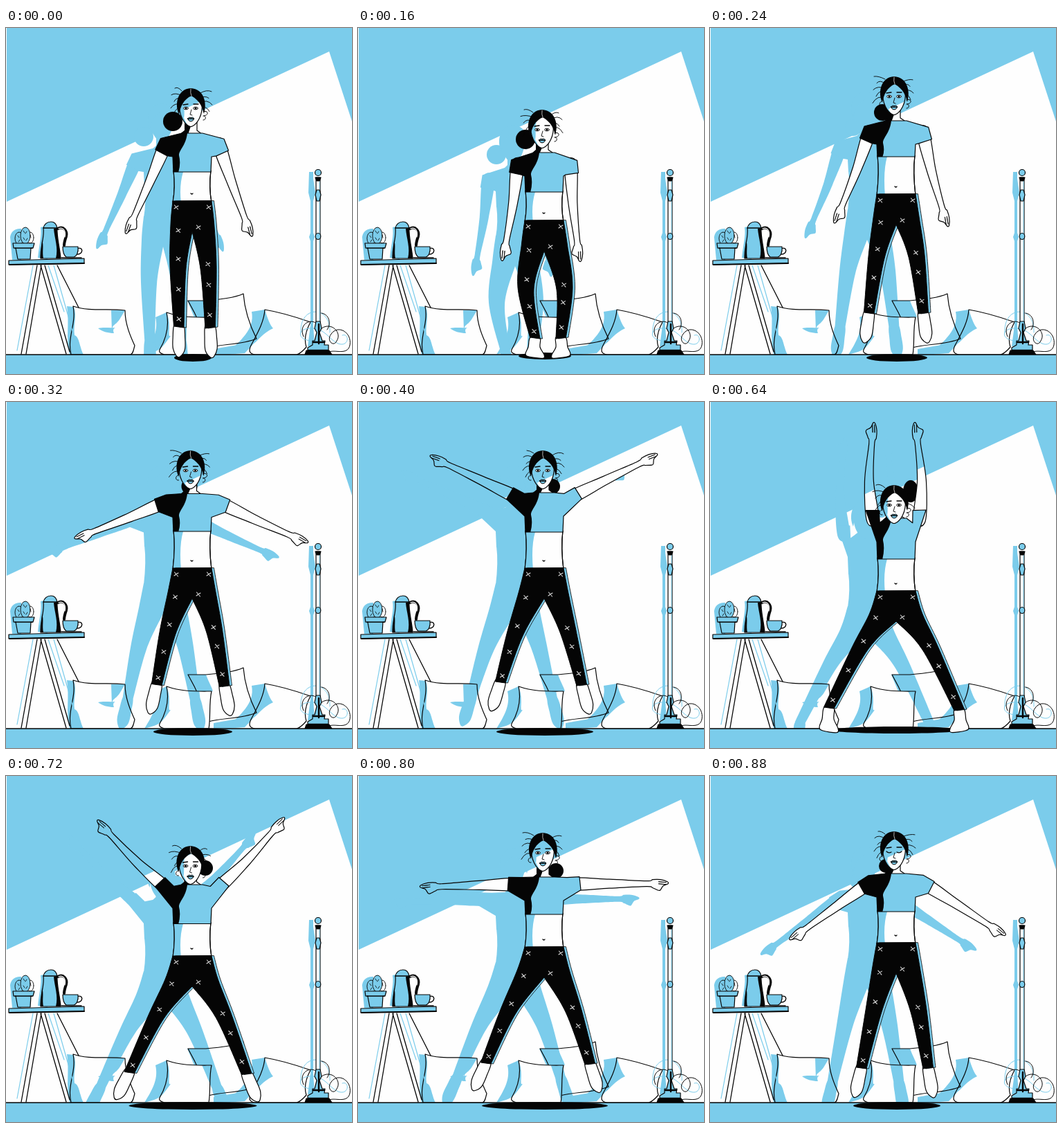
Write an HTML page with a canvas that moves like this. It is 500x500 px and loops after 960 ms.

```html
<!DOCTYPE html>
<html lang="en">
<head>
<meta charset="utf-8">
<title>Jumping jacks</title>
<style>
html, body { margin: 0; width: 500px; height: 500px; overflow: hidden; background: #fefefe; }
canvas { display: block; width: 500px; height: 500px; }
</style>
</head>
<body>
<canvas id="stage" width="500" height="500"></canvas>
<script>
const ctx = document.getElementById('stage').getContext('2d');
const BLUE = '#7bcceb', INK = '#050505', WHITE = '#fefefe';
const CX = 269, FLOOR = 472, RAD = Math.PI / 180;

// face x, y | bun x, y, r | neck, hem, waist | floor shadow radius
const BODY = [
  [267, 118, 241, 135, 14, 152, 208, 250, 27],
  [266, 149, 242, 161, 14, 180, 237, 278, 38],
  [266, 101, 249, 122, 12, 134, 186, 240, 44],
  [267, 101, 281, 122, 11, 131, 188, 240, 70],
  [266, 151, 290, 129, 11, 168, 227, 273, 94],
  [267, 113, 286, 137, 11, 146, 200, 247, 91],
  [266, 111, 254, 130, 10, 141, 196, 241, 63]
];
// left angle, right angle (0 is down, 180 is up), elbow bend
const ARMS = [
  [23, 19, 1], [8, 4.5, 2], [20, 14, 2], [115, 116, 0], [179, 181, 5], [88, 90, 0], [54, 57, 0]
];
// left knee, left ankle, right knee, right ankle
const LEGS = [
  [249, 345, 250, 431, 292, 345, 295, 432],
  [243, 375, 256, 447, 298, 375, 293, 447],
  [241, 330, 230, 411, 298, 328, 308, 411],
  [227, 335, 206, 404, 303, 330, 323, 408],
  [217, 355, 172, 441, 318, 355, 360, 444],
  [217, 340, 185, 414, 311, 338, 335, 415],
  [237, 338, 219, 421, 301, 338, 315, 421]
];
// start time, from pose, to pose, blend, feet flat
const STEPS = [
  [0, 0, 0, 0, 0], [80, 0, 1, .6, 1], [160, 1, 1, 0, 1], [240, 2, 2, 0, 0],
  [320, 2, 3, .5, 0], [400, 3, 3, 0, 0], [520, 3, 4, .4, 0], [560, 3, 4, .8, 1],
  [640, 4, 4, 0, 1], [720, 4, 5, .5, 0], [800, 5, 5, 0, 0], [880, 6, 6, 0, 0]
];
const LOOP = 960;

const mix = (table, a, b, k) => table[a].map((v, i) => v + (table[b][i] - v) * k);
const lerp = (a, b, k) => [a[0] + (b[0] - a[0]) * k, a[1] + (b[1] - a[1]) * k];
const shift = (p, d, n, u, v) => [p[0] + d[0] * u + n[0] * v, p[1] + d[1] * u + n[1] * v];
const axes = (deg, side) => {
  const s = Math.sin(deg * RAD), c = Math.cos(deg * RAD);
  return [[side * s, c], [side * c, -s]];
};

const wall = new Path2D('M1 0H500V135L467 34L1 251Z');
const figureLight = new Path2D('M0 -20H500V105L467 20L0 237Z');

function poly(pts) {
  const p = new Path2D();
  pts.forEach(q => p.lineTo(q[0], q[1]));
  p.closePath();
  return p;
}

// smooth line through points, added to path p
function spline(p, pts, closed) {
  const n = pts.length, at = i => closed ? pts[(i + n) % n] : pts[Math.max(0, Math.min(n - 1, i))];
  p.lineTo(...pts[0]);
  for (let i = 0; i < (closed ? n : n - 1); i++) {
    const [a, b, c, d] = [at(i - 1), at(i), at(i + 1), at(i + 2)];
    p.bezierCurveTo(b[0] + (c[0] - a[0]) / 6, b[1] + (c[1] - a[1]) / 6,
      c[0] - (d[0] - b[0]) / 6, c[1] - (d[1] - b[1]) / 6, c[0], c[1]);
  }
  return p;
}

function disc(x, y, rx, ry = rx) {
  const p = new Path2D();
  p.ellipse(x, y, rx, ry, 0, 0, 7);
  return p;
}

function fill(p, color) { ctx.fillStyle = color; ctx.fill(p); }
function line(p, color = INK, w = 1.2) {
  ctx.strokeStyle = color;
  ctx.lineWidth = w;
  ctx.stroke(typeof p === 'string' ? new Path2D(p) : p);
}
function shape(d, color, w = 1.2) {
  const p = typeof d === 'string' ? new Path2D(d) : d;
  if (color) fill(p, color);
  if (w) line(p, INK, w);
}
function within(p, draw) { ctx.save(); ctx.clip(p); draw(); ctx.restore(); }

// ---- room ----
const PILLOWS = [
  'M289 394C310 392 330 390 343 384C345 410 355 435 362 449C340 458 315 456 292 462C286 440 275 415 263 394Z',
  'M232 411C255 419 275 418 297 418C293 436 296 456 293 472H229C222 470 221 468 222 465C232 448 236 430 232 411Z',
  'M374 407C398 411 420 418 440 425C432 440 431 452 434 461C428 468 424 471 420 472H360C348 470 352 462 356 455C364 440 373 424 374 407Z',
  'M97 402C120 410 148 405 172 408C172 428 180 446 186 459C184 466 184 470 180 472H94C88 446 102 428 97 402Z'
].map(d => new Path2D(d));
const SHADES = [
  'M262 394L289 394C295 410 302 420 297 418L272 418Z',
  'M216 418L232 411C240 430 232 448 238 445C230 455 226 464 214 468L200 472C214 450 220 436 216 418Z',
  'M355 410L374 407C378 420 382 430 386 434C372 440 364 452 358 456L345 470L318 472C338 452 360 436 355 410Z',
  'M300 464L345 456L340 466L322 472H300Z',
  'M88 402L98 403C103 416 97 430 99 444C106 446 106 460 112 472H92C86 450 92 425 88 402Z',
  'M133 434C142 432 150 434 158 433C154 435 155 438 156 441C148 441 140 439 133 434Z',
  'M152 408L172 408L166 418C158 432 154 426 153 438Z'
].map(d => new Path2D(d));

function backdrop() {
  fill(poly([[0, 0], [500, 0], [500, 500], [0, 500]]), WHITE);
  fill(wall, BLUE);
  PILLOWS.forEach(p => fill(p, WHITE));
  SHADES.forEach(p => fill(p, BLUE));
}

function table() {
  line('M39 343L16 466M69 343L100 452M61 343L84 410', BLUE, 1.2);
  line('M45 343L22 471M51 343L29 471M50 343L87 471M56 343L92 468M74 343L105 404', INK, 1.3);
  shape('M4 336L113 333V340L4 342Z', BLUE);
  line('M5 342L113 340', INK, 2);
  // cactus and pot
  fill(new Path2D('M6 302C8 290 18 290 22 290V335H9Z'), BLUE);
  for (const [x, y, rx, ry] of [[19, 304, 6, 9], [35, 303, 5, 8], [28, 300, 7, 12]])
    shape(disc(x, y, rx, ry), x > 30 ? WHITE : BLUE, .9);
  line('M25 293l2 3M30 294l-2 3M25 303l2 3M31 304l-2 3M17 300l2 3M35 299l1 4M20 306l-2 3', INK, .8);
  shape('M10 311H41L39 318H36L35 334H17L14 318H11Z', BLUE);
  line('M13 318H38', INK, 1.6);
  // pitcher
  fill(new Path2D('M46 332C48 312 52 300 50 288L60 286V334Z'), BLUE);
  shape('M54 289C55 284 59 280 65 280C70 280 73 284 74 289C73 302 78 318 79 333H50C49 318 56 302 54 289Z', BLUE);
  fill(new Path2D('M69 290L74 289C73 302 78 318 79 333H72C76 318 70 304 69 290Z'), INK);
  fill(new Path2D('M52 306L50 333H54C52 324 55 314 52 306Z'), INK);
  line('M54 289H74', INK, 1.5);
  line('M75 290C83 285 89 294 87 301C85 307 84 310 84 314', INK, 4);
  line('M76 290C83 287 87 294 85 302', WHITE, 1.2);
  // cup
  line('M103 319C112 315 112 327 103 327', INK, 1.4);
  shape('M82 316H104C105 324 102 330 98 331H87C83 328 82 322 82 316Z', BLUE);
  line('M80 332H109', INK, 1.5);
}

function lamp() {
  fill(new Path2D('M438 208H444V218L447 238L444 250V296L446 302L444 308V430L446 460H436L440 430V308L438 302L440 296V250L437 238Z'), BLUE);
  line('M443 452C420 452 420 434 440 434C462 434 466 450 480 456C496 462 497 440 486 444M426 440C424 400 470 400 468 440', BLUE, 1);
  line('M456 434C470 424 486 440 478 452C474 462 462 452 470 442C480 428 500 440 497 458C494 474 474 464 468 468M430 446C422 428 440 420 447 426M456 412C468 414 470 428 464 436', INK, 1);
  shape('M448 216H454V428H448Z', WHITE);
  line('M453 216V428', BLUE, 1);
  shape(disc(451, 209, 4.5), BLUE);
  shape('M447 216H455L453 221H449Z', INK);
  shape('M449 234H453L455 241L453 250H449L447 241Z', BLUE);
  shape(disc(451, 301, 3.8, 4.5), BLUE);
  shape('M448 424H454L456 434L453 440L457 452H461L460 458H466V466H436V462L443 458V452H446L449 440L446 434Z', BLUE);
  line('M452 428V456M444 454H460M437 466H465', INK, 2.4);
  shape('M434 466H467L471 472H432Z', INK);
}

// ---- figure ----
let silhouette = false;

function part(p, color, w = 1.2) {
  if (silhouette) return fill(p, BLUE);
  shape(p, color, w);
}
function skin(p) {
  if (silhouette) return fill(p, BLUE);
  fill(p, WHITE);
  within(p, () => fill(figureLight, BLUE));
  line(p);
}

function arm(s, side, deg, bend) {
  const [d1, n1] = axes(deg - bend, side), [d2, n2] = axes(deg + bend, side);
  const elbow = shift(s, d1, n1, 58, 0), wrist = shift(elbow, d2, n2, 54, 0);
  const hand = (u, v) => shift(wrist, d2, n2, u, v);
  const p = spline(new Path2D(), [
    shift(s, d1, n1, 0, 8), shift(elbow, d1, n1, 0, 6.5), hand(0, 4),
    hand(9, 6), hand(20, 6), hand(30, 3), hand(31, 0), hand(24, -3), hand(20, -9),
    hand(17, -9.5), hand(9, -6), hand(0, -4), shift(elbow, d1, n1, 0, -6.5), shift(s, d1, n1, 0, -9)
  ], true);
  skin(p);
  if (silhouette) return;
  line(poly([hand(17, 3), hand(28, 2)]), INK, .8);
  line(poly([hand(17, 0), hand(28, -1)]), INK, .8);
}

function foot(k, a, side, flat) {
  const p = new Path2D();
  if (flat) {
    const h = 475 - a[1], at = (u, v) => [a[0] + side * u, a[1] + v * h];
    spline(p, [at(-7, 0), at(7, 0), at(10, .5), at(14, .85), at(9, 1), at(-11, 1.08), at(-13, .9), at(-7, .5)], true);
  } else {
    const len = Math.hypot(a[0] - k[0], a[1] - k[1]);
    const d = [(a[0] - k[0]) / len, (a[1] - k[1]) / len], n = [side * d[1], -side * d[0]];
    spline(p, [[-3, 6.5], [16, 9], [32, 9], [43, 4], [44, -1], [34, -8], [16, -8.5], [-3, -6.5]]
      .map(q => shift(a, d, n, q[0], q[1])), true);
  }
  part(p, WHITE);
}

function pants(waist, kl, al, kr, ar) {
  const crotch = [CX, waist + 44];
  const p = new Path2D();
  const out = (x, k, a, s) => [[CX + s * x, waist], [CX + s * 33 + (k[0] - CX + s * -28) * .25, waist + 34],
    [k[0] + s * 12, k[1]], [a[0] + s * 7.5, a[1]]];
  const inn = (k, a, s) => [[a[0] - s * 7, a[1] + 2], [k[0] - s * 11, k[1] + 3], crotch];
  spline(p, out(28, kl, al, -1));
  spline(p, inn(kl, al, -1));
  spline(p, inn(kr, ar, 1).reverse());
  spline(p, out(28, kr, ar, 1).reverse());
  p.closePath();
  if (!silhouette) {
    ctx.save();
    ctx.translate(3.5, 0);
    shape(p, BLUE, .8);
    ctx.restore();
  }
  part(p, INK, 1);
  if (silhouette) return;
  const hl = [CX - 20, waist + 20], hr = [CX + 19, waist + 20];
  const marks = [[CX - 23, waist + 9], [CX + 24, waist + 9], [CX + 9, waist + 38],
    lerp(hl, kl, .3), lerp(hl, kl, .85), lerp(kl, al, .38), lerp(kl, al, .88),
    lerp(hr, kr, .95), lerp(kr, ar, .3), lerp(kr, ar, .8)];
  for (const [x, y] of marks)
    line(`M${x - 2.5} ${y - 3}l5 6M${x + 3} ${y - 2}l-6 4`, '#ddd', 1.1);
}

function shirt(neck, hem, l, r) {
  const half = (s, [d, n], side) => [[CX + side * 15, neck], shift(s, d, n, -3, 9), shift(s, d, n, 15, 10),
    shift(s, d, n, 17, -9), [CX + side * 28, neck + 34], [CX + side * 27, hem]];
  const left = half(l.s, l.ax, -1), right = half(r.s, r.ax, 1);
  const all = poly([...left, ...right.reverse()]);
  part(all, BLUE);
  if (silhouette) return;
  within(all, () => fill(new Path2D(
    `M100 0H262V${neck}C260 ${neck + 18} 250 ${neck + 24} 250 ${neck + 32}Q253 ${neck + 44} 249 ${hem + 1}H100Z`), INK));
}

const FACE = new Path2D('M-16 -9C-18 8 -9 21 -2 24Q0 25 2 24C9 21 18 8 16 -9C14 -24 -14 -24 -16 -9Z');
const HAIR = new Path2D('M-17 7C-24 -8 -19 -30 0 -31C19 -30 24 -10 19 6C17 -3 14 -12 1 -20C-10 -15 -15 -5 -17 7Z');

function head(x, y, pose) {
  ctx.save();
  ctx.translate(x, y);
  if (silhouette) {
    fill(FACE, BLUE);
    fill(HAIR, BLUE);
    return ctx.restore();
  }
  // loose strands
  for (let i = 0; i < 9; i++) {
    const s = i % 2 ? 1 : -1, h = -27 + i * 3.4, w = 10 + (i * 7 + pose * 3) % 9;
    line(`M${s * 13} ${h}q${s * w * .6} ${-7 + (i + pose) % 4} ${s * w} ${i * 1.4 - 4}`, INK, .9);
  }
  shape('M18 3C25 0 27 8 19 9M18 9C22 8 23 15 18 15M-18 5C-23 7 -21 13 -17 12', null, 1);
  fill(FACE, WHITE);
  within(FACE, () => {
    fill(new Path2D('M-20 -30H-4C-12 -10 -8 5 -10 12L-3 26H-20Z'), BLUE);
    ctx.translate(-x, -y);
    fill(figureLight, BLUE);
  });
  line(FACE);
  fill(HAIR, INK);
  line('M0 -30Q-1 -24 1 -20', WHITE, .7);
  line('M-11 -7L-4 -8M4 -8L11 -8', INK, 1.3);
  if (pose === 6) {
    line('M-11 -2Q-8 1 -4 -1M4 -1Q8 1 11 -2', INK, 1.2);
  } else {
    for (const e of [-7, 7]) {
      shape(disc(e, -2, 3.4, 1.9), WHITE, .9);
      fill(disc(e, -2, 1.5), INK);
    }
  }
  line('M1 0L-1 7L2 8', INK, .9);
  shape('M-4.5 13Q-2 10 0 11.5Q3 10 5 13Q3 17 0 17Q-3 17 -4.5 13Z', BLUE, 1);
  line('M-4 13.3H4', INK, 1.5);
  ctx.restore();
}

function figure(pose, body, arms, legs, flat) {
  const [fx, fy, bx, by, br, neck, hem, waist] = body;
  const [al, ar, bend] = arms;
  const joint = i => legs.slice(i, i + 2);
  const shoulder = (deg, side) => ({
    s: [CX + side * (39 - deg / 30), neck + 15 - deg / 17], ax: axes(deg - bend, side)
  });
  const l = shoulder(al, -1), r = shoulder(ar, 1);

  foot(joint(0), joint(2), -1, flat);
  foot(joint(4), joint(6), 1, flat);

  const belly = new Path2D(
    `M242 ${hem - 2}H296Q293 ${hem + 22} 297 ${waist + 2}H241Q245 ${hem + 22} 242 ${hem - 2}Z`);
  part(belly, WHITE);
  if (!silhouette) {
    within(belly, () => fill(new Path2D(`M238 ${hem}H256Q250 ${hem + 20} 253 ${waist + 3}H238Z`), BLUE));
    line(belly);
    line(`M${CX - 2} ${waist - 11}q2 2 3 0`, INK, 1.3);
  }
  pants(waist, joint(0), joint(2), joint(4), joint(6));

  part(disc(bx, by, br, br + (al > 150 ? 5 : 0)), INK, 0);
  const throat = new Path2D(`M${fx - 8} ${fy + 12}V${neck - 4}L252 ${neck + 2}H284L${fx + 9} ${neck - 4}V${fy + 12}Z`);
  skin(throat);
  if (!silhouette)
    fill(new Path2D(`M${fx - 9} ${fy + 15}L${fx} ${fy + 24}L${fx - 4} ${neck + 2}H250L${fx - 9} ${neck - 4}Z`), INK);

  arm(l.s, -1, al, bend);
  arm(r.s, 1, ar, bend);
  shirt(neck, hem, l, r);
  head(fx, fy, pose);
}

function draw(t) {
  const [, a, b, k, flat] = STEPS.filter(s => s[0] <= t).pop();
  const pose = k > .5 ? b : a;
  const body = mix(BODY, a, b, k), arms = mix(ARMS, a, b, k), legs = mix(LEGS, a, b, k);
  const paint = () => figure(pose, body, arms, legs, flat);

  ctx.lineJoin = ctx.lineCap = 'round';
  backdrop();

  // cast shadow on the wall and pillows
  silhouette = true;
  within(new Path2D('M0 0H500V472H0Z'), () => {
    ctx.translate(-42, 22);
    paint();
  });
  silhouette = false;

  within(poly([[0, 0], [500, 0], [500, FLOOR], [0, FLOOR]]), () => {
    line(PILLOWS[0]);
    fill(PILLOWS[1], WHITE);
    within(PILLOWS[1], () => {
      fill(SHADES[1], BLUE);
      silhouette = true;
      ctx.translate(-42, 22);
      paint();
      silhouette = false;
    });
    PILLOWS.slice(1).forEach(p => line(p));
  });
  table();
  lamp();
  fill(poly([[0, FLOOR], [500, FLOOR], [500, 500], [0, 500]]), BLUE);
  line(`M0 ${FLOOR}H500`, INK, 1.3);
  fill(disc(270, flat ? 474 : 476.5, body[8], flat ? 5 : 5.5), INK);
  paint();
}

function tick() {
  draw(performance.now() % LOOP);
  requestAnimationFrame(tick);
}
tick();
</script>
</body>
</html>
```
